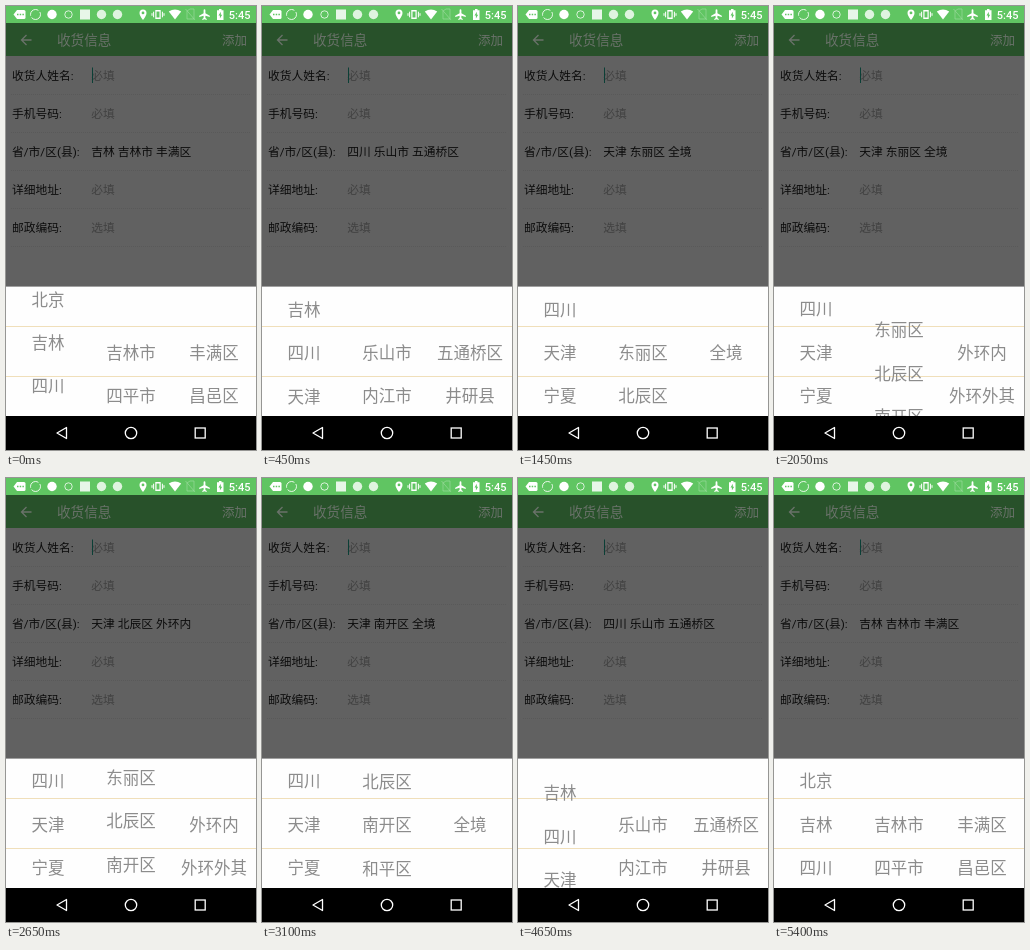
An HTML page for the animation above (5.45 s loop, 250x444 px).

```html
<!DOCTYPE html>
<html lang="zh-CN">
<head>
<meta charset="utf-8">
<style>
html, body { margin: 0; width: 100%; height: 100%; overflow: hidden; background: #000; }
svg { display: block; width: 250px; height: 444px; }
text { font-family: Roboto, "Noto Sans CJK SC", "Noto Sans CJK", sans-serif; white-space: pre; }
</style>
</head>
<body>
<svg viewBox="0 0 250 444">
  <rect width="250" height="444" fill="#616161"/>
  <rect width="250" height="50" fill="#28512a"/>
  <rect width="250" height="17" fill="#60c562"/>

  <g id="status" fill="#fff">
    <path d="M7.500 8.500l3.500-4.500h7q1.500 0 1.500 1.500v6q0 1.500-1.500 1.500h-7z"/>
    <path d="M11 8.500h1.500m1.200 0h1.500m1.200 0h1.500" stroke="#60c562" stroke-width="1.500"/>
    <g fill="none" stroke="#fff">
      <circle cx="29.500" cy="8.500" r="5" stroke-dasharray="12 2" opacity=".85"/>
      <circle cx="62.500" cy="8.500" r="3.700" opacity=".75"/>
    </g>
    <circle cx="46" cy="8.500" r="4.700"/>
    <rect x="74" y="3.500" width="10" height="10" opacity=".85"/>
    <circle cx="95.500" cy="8.500" r="4.700" opacity=".8"/>
    <circle cx="111.500" cy="8.500" r="4.700" opacity=".8"/>
    <path fill-rule="evenodd" d="M137 14q-3.500-4.500-3.500-7a3.500 3.500 0 0 1 7 0q0 2.500-3.500 7zm0-8.500a1.400 1.400 0 1 0 0 2.800 1.400 1.400 0 0 0 0-2.800z"/>
    <path fill-rule="evenodd" d="M149.300 4h5.400v9h-5.400zm1.200 1.600v5.800h3V5.600z"/>
    <path d="M147.600 5.700v5.600m8.800-5.600v5.600M146 7.200v2.600m12-2.600v2.600" stroke="#fff"/>
    <path d="M162.800 5.500q6.200-4.200 12.400 0L169 13.500z"/>
    <path d="M181 5l3-2h4v10h-7zM179.500 3l9.500 11" fill="none" stroke="#a2dca3" opacity=".6"/>
    <path d="M198.500 3.200q.9 0 .9 1.300v2.700l4.400 2.600V11l-4.400-1.300V12l1.300 1v.9l-2.200-.6-2.200.6V13l1.300-1V9.700L193.200 11V9.800l4.400-2.600V4.500q0-1.300.9-1.300z"/>
    <path d="M211 4.300h2V3h2.500v1.300h2V14H211z"/>
    <path d="M214.800 5.700l-2.300 3.800h1.400v3l2.300-3.800h-1.400z" fill="#60c562"/>
  </g>

  <path d="M25.500 34H15.500m5-5l-5 5 5 5" fill="none" stroke="#6a726a" stroke-width="1.300"/>
  <g id="form"></g>
  <rect x="86" y="61.500" width="1" height="15.500" fill="#0b3f36"/>

  <clipPath id="panel"><rect y="280.600" width="250" height="130"/></clipPath>
  <rect y="280.600" width="250" height="130" fill="#fefefe"/>
  <path d="M0 320.500h250M0 370.500h250" stroke="#f0dfba"/>
  <g id="wheels" clip-path="url(#panel)"></g>

  <rect y="410" width="250" height="34" fill="#000"/>
  <g fill="none" stroke="#fff" stroke-width="1.300">
    <path d="M60.500 421.500v11l-9.500-5.500z" stroke-linejoin="round"/>
    <circle cx="125" cy="427" r="5.700"/>
    <rect x="189.200" y="422" width="10" height="10"/>
  </g>
</svg>
<script>
const LOOP = 5450, STEP = 50, PITCH = 43.2, MID = 346.5, LAG = 100;
const form = document.getElementById('form');
const wheels = document.getElementById('wheels');

// province -> [city, districts]
const regions = [
  ['北京', []],
  ['吉林', [['吉林市', ['丰满区', '昌邑区']], ['四平市', []]]],
  ['四川', [['乐山市', ['五通桥区', '井研县']], ['内江市', []]]],
  ['天津', [['东丽区', ['全境']], ['北辰区', ['外环内', '外环外其']],
            ['南开区', ['全境']], ['和平区', ['全境']]]],
  ['宁夏', []]
];

// A flick moves a wheel by one row: quick start, long settle
function flick(t, start) {
  const dt = Math.max(0, t - start);
  return 1 - Math.exp(-Math.pow(dt / 192, 1.5));
}

const provinceAt = t =>
  1 + flick(t, -28) + flick(t, 846) - flick(t, 3750) - flick(t, 4559);
const cityAt = t => flick(t, 1896) + flick(t, 2615);

// y is the vertical centre of the glyphs
function addText(parent, str, x, y, size, fill, anchor = 'start') {
  const el = document.createElementNS('http://www.w3.org/2000/svg', 'text');
  el.textContent = str;
  const attrs = { x, y: y + size * .37, 'font-size': size, fill, 'text-anchor': anchor };
  for (const k in attrs) el.setAttribute(k, attrs[k]);
  parent.appendChild(el);
  return el;
}

function addLine(y) {
  const el = document.createElementNS('http://www.w3.org/2000/svg', 'path');
  el.setAttribute('d', `M5 ${y}H245`);
  el.setAttribute('stroke', '#595959');
  el.setAttribute('stroke-dasharray', '1 1');
  form.appendChild(el);
}

addText(form, '收货信息', 51, 34, 13.6, '#6a726a');
addText(form, '添加', 241, 34, 12.5, '#6a726a', 'end');
addText(form, '5:45', 244.5, 8.8, 11, '#fff', 'end').setAttribute('font-weight', 500);

let address;
[['收货人姓名:', '必填'], ['手机号码:', '必填'], ['省/市/区(县):', ''],
 ['详细地址:', '必填'], ['邮政编码:', '选填']].forEach(([label, hint], i) => {
  const y = 69.7 + i * 38.1;
  addText(form, label, 6, y, 11.75, '#0c0c0c');
  const value = addText(form, hint, 85.3, y, 11.75, hint ? '#424242' : '#0c0c0c');
  if (!hint) address = value;
  addLine(Math.round(y + 19) - .5);
});

function pick(t) {
  const pos = provinceAt(t);
  const province = regions[Math.round(pos)];
  const cityPos = province[0] === '天津' ? cityAt(t) : 0;
  return { pos, province, cityPos, city: province[1][Math.round(cityPos)] };
}

function drawWheel(names, pos, x) {
  names.forEach((name, i) => {
    const y = MID + (i - pos) * PITCH;
    if (y > 268 && y < 424) addText(wheels, name, x, y, 16.5, '#8c8c8c', 'middle');
  });
}

function render(time) {
  // the opening picture is held for two steps
  const t = Math.max(STEP, Math.floor(time % LOOP / STEP) * STEP);
  const now = pick(t), shown = pick(Math.max(0, t - LAG));
  address.textContent = [shown.province[0], shown.city[0], shown.city[1][0]].join(' ');
  wheels.textContent = '';
  drawWheel(regions.map(r => r[0]), now.pos, 42);
  drawWheel(now.province[1].map(c => c[0]), now.cityPos, 125);
  drawWheel(now.city[1], 0, 208);
}

const start = performance.now();
function loop() {
  render(performance.now() - start);
  requestAnimationFrame(loop);
}
loop();
</script>
</body>
</html>
```
